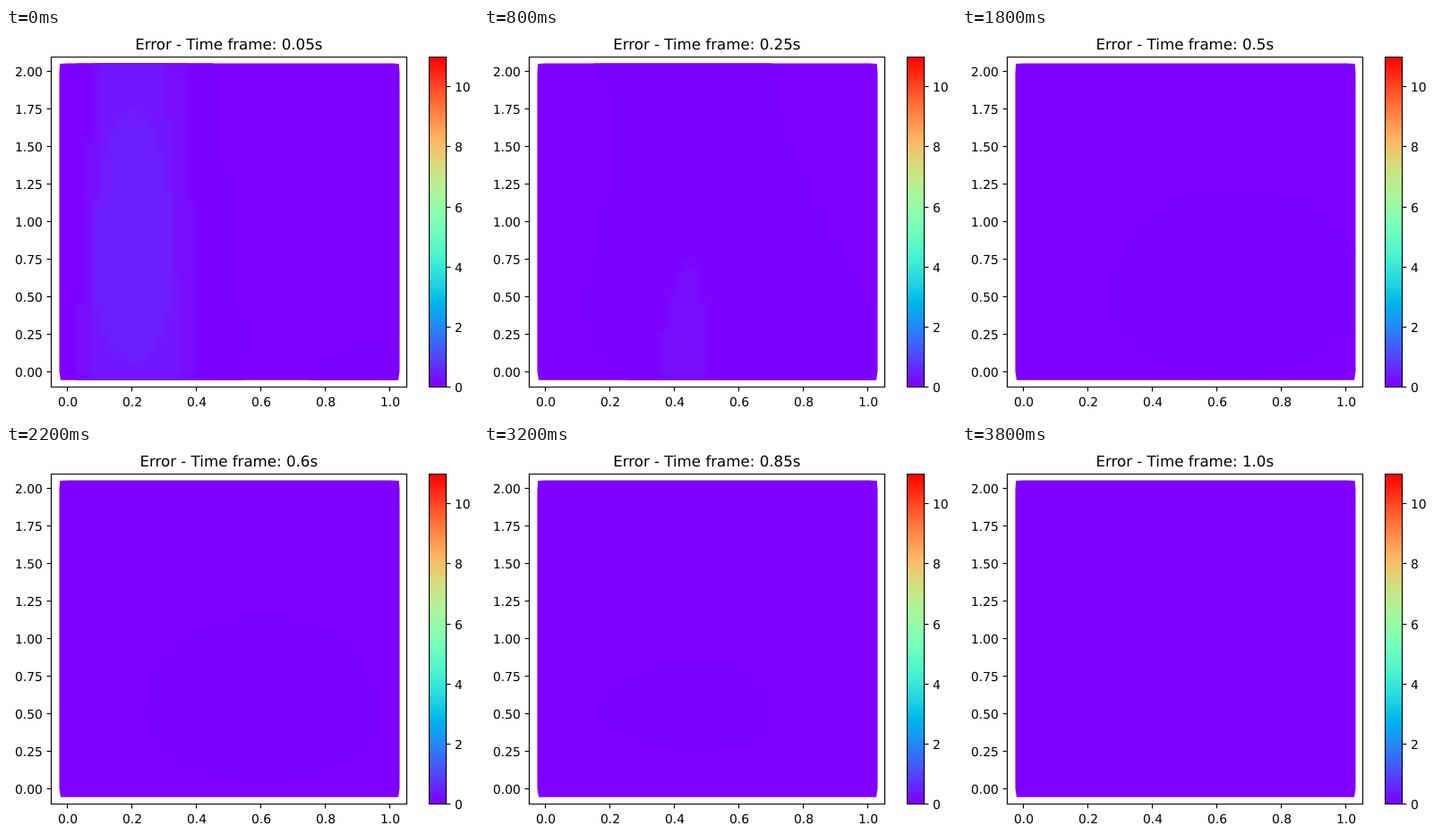
These frames come from a looping animation (527x435 px, 4000 ms). An HTML page:

```html
<!DOCTYPE html>
<html lang="en">
<head>
<meta charset="utf-8">
<title>Error plot</title>
<style>
  html, body { margin: 0; width: 100%; height: 100%; overflow: hidden; background: #fff; }
  svg { display: block; width: 527px; height: 435px; }
  text { font: 13.89px "DejaVu Sans", sans-serif; fill: #000; text-rendering: geometricPrecision; }
  #title { font-size: 16.67px; }
  .line { fill: none; stroke: #000; stroke-width: 1.11; }
</style>
</head>
<body>
<svg viewBox="0 0 527 435">
  <rect width="527" height="435" fill="#fff"/>
  <clipPath id="area">
    <path d="M60.3 40L69 39.4H430L438.7 40L439.5 50V384L438 393.8H61L59.5 384V50Z"/>
  </clipPath>
  <g clip-path="url(#area)" shape-rendering="crispEdges">
    <rect x="59" y="39" width="382" height="356" fill="#7f00ff"/>
    <g id="field"></g>
  </g>
  <g id="bar" shape-rendering="crispEdges"></g>
  <g id="axes"></g>
  <text id="title" x="248.8" y="24" text-anchor="middle"></text>
</svg>
<script>
const STEP = 200, COUNT = 20;
const TOP = 39, BOTTOM = 395, LEFT = 60, RIGHT = 440, ROW = 4, COLUMN = 9;
const $ = id => document.getElementById(id);
const lerp = (a, b, t) => a + (b - a) * t;
const depth = y => (y - TOP) / (BOTTOM - TOP);

function add(parent, tag, attrs, content = "") {
  const node = document.createElementNS("http://www.w3.org/2000/svg", tag);
  for (const key in attrs) node.setAttribute(key, attrs[key]);
  node.textContent = content;
  parent.append(node);
}

// Rainbow colour map, level 0..255
function rainbow(level) {
  const x = level / 255;
  const parts = [Math.abs(2 * x - 0.5), Math.sin(Math.PI * x), Math.cos(Math.PI * x / 2)];
  return `rgb(${parts.map(v => Math.floor(Math.min(1, Math.max(0, v)) * 255)).join()})`;
}

function drawAxes() {
  const axes = $("axes");
  const line = d => add(axes, "path", { class: "line", d });
  const label = (x, y, value) => add(axes, "text", { x, y }, value);

  for (let y = 32; y < 401; y++) {
    const level = Math.floor((400.5 - y) / 369 * 256);
    add($("bar"), "rect", { x: 473, y, width: 18, height: 1, fill: rainbow(level) });
  }
  line("M50.5 32.5H447.5V401.5H50.5Z");
  line("M472.5 32.5H491.5V401.5H472.5Z");
  for (let i = 0; i < 6; i++) {
    const y = Math.floor(401.6 - 67.19 * i) + 0.5;
    line(`M${68.5 + 72 * i} 401.5v4.9`);
    label(58 + 72 * i, 423, (i / 5).toFixed(1));
    line(`M491.5 ${y}h4.9`);
    label(501, y + 5.5, i * 2);
  }
  for (let i = 0; i < 9; i++) {
    const y = 384.5 - 42 * i;
    line(`M50.5 ${y}h-4.9`);
    label(10, y + 5.5, (i / 4).toFixed(2));
  }
}

// Each shape maps a row y to its [left, right] extent.
const band = (left, right) => y => [lerp(...left, depth(y)), lerp(...right, depth(y))];

const egg = ({ x, y: middle, left, right, up, down, power = 2 }) => y => {
  const reach = Math.abs(y - middle) / (y < middle ? up : down);
  const width = Math.max(0, 1 - reach ** power) ** (1 / power);
  return [x - left * width, x + right * width];
};

const blend = (from, to, t) => y => {
  const end = to(y);
  return from(y).map((v, i) => lerp(v, end[i], t));
};

const plume = y => {
  const u = depth(y);
  return [124 - 80 * u ** 1.6, 286 + 39 * u + 220 * u ** 12];
};

const sheet = y => {
  const u = depth(y);
  return [122 + 38 * Math.sin(Math.PI * u ** 0.6) + 118 * u ** 10, 348 + 246 * u ** 1.6];
};

const island = life => egg({
  x: 220 + 93 * life, y: 300,
  left: 145 * life ** 0.2, right: 133 * life ** 0.3,
  up: 123 * life ** 0.5, down: 88 * life ** 0.5
});

const ridge = life => egg({
  x: lerp(260, 185, life), y: 380,
  left: 88 * life, right: 55 * life, up: 308 * life, down: 60, power: 1.5
});

function lowestLevel(step) {
  if (step <= 6) return blend(plume, sheet, (step - 1) / 5);
  if (step <= 9) return blend(sheet, island(1), (step - 6) / 3);
  return island((18 - step) / 9);
}

// Extents snap to the columns of the sample grid.
function fillShape(level, shape) {
  const snap = x => LEFT + COLUMN * Math.round((Math.min(RIGHT, Math.max(LEFT, x)) - LEFT) / COLUMN);
  let d = "";
  for (let y = TOP; y < BOTTOM; y += ROW) {
    const [l, r] = shape(y + ROW / 2).map(snap);
    if (r > l) d += `M${l} ${y}H${r}v${ROW}H${l}Z`;
  }
  add($("field"), "path", { d, fill: rainbow(level) });
}

function drawOpening() {
  fillShape(1, egg({ x: RIGHT, y: BOTTOM, left: 100, right: 0, up: 43, down: 1 }));
  fillShape(1, band([78, 78], [232, 270]));
  fillShape(4, band([96, 78], [205, 213]));
  fillShape(7, band([105, 96], [178, 197]));
  fillShape(9, egg({ x: 142, y: 270, left: 46, right: 45, up: 180, down: 104 }));
}

function drawStep(step) {
  $("title").textContent = `Error - Time frame: ${((step + 1) / 20).toFixed(2).replace(/0$/, "")}s`;
  $("field").replaceChildren();
  if (step === 0) return drawOpening();
  if (step < 18) fillShape(1, lowestLevel(step));
  if (step < 6) fillShape(4, ridge((6 - step) / 5));
}

let shown = -1;
const start = performance.now();
function tick() {
  const step = Math.floor((performance.now() - start) / STEP) % COUNT;
  if (step !== shown) drawStep(shown = step);
  requestAnimationFrame(tick);
}

drawAxes();
tick();
</script>
</body>
</html>
```
